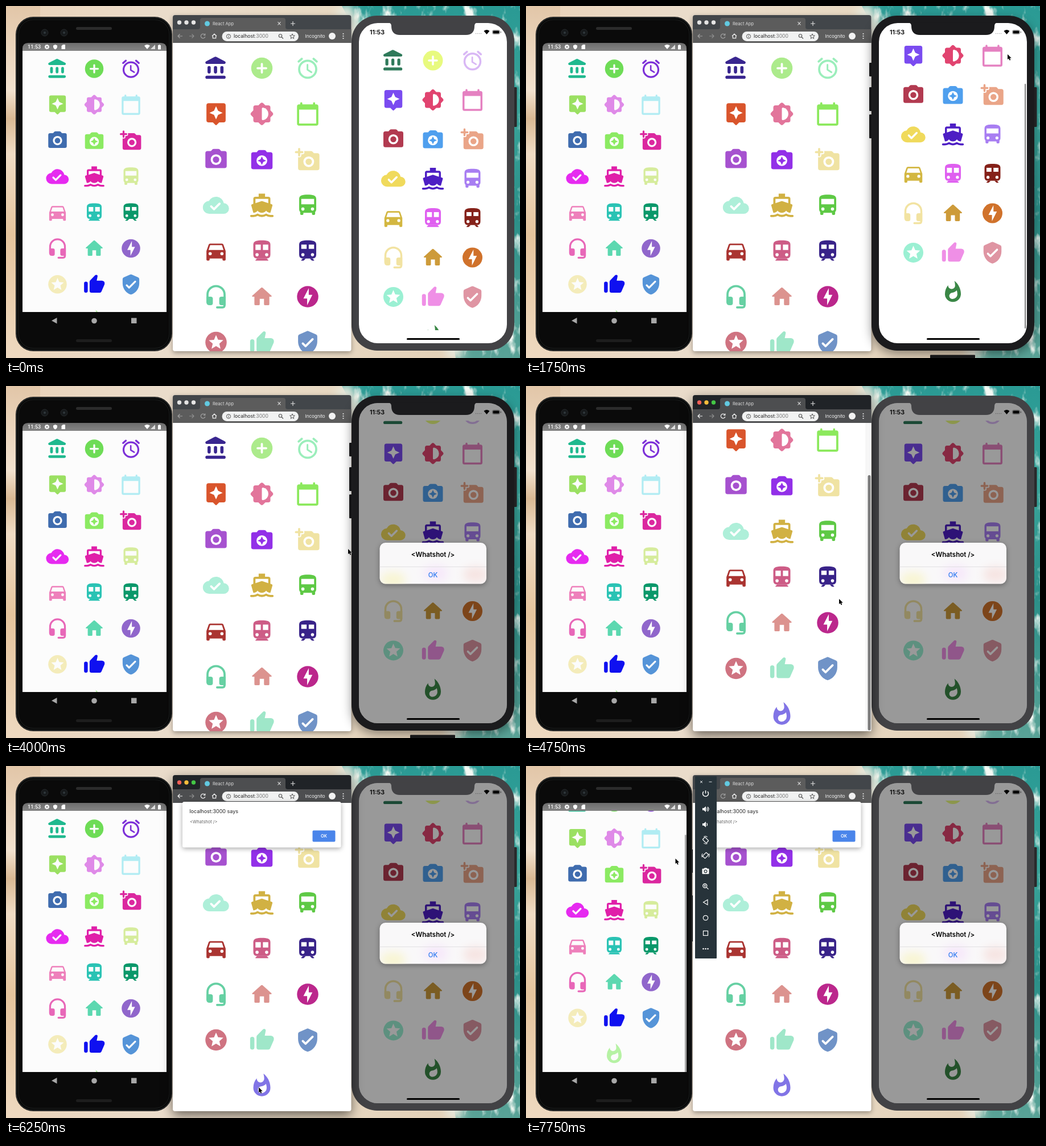
An HTML page that plays this animation: 903x620 px, repeating every 8000 ms.

```html
<!DOCTYPE html>
<html lang="en">
<head>
<meta charset="utf-8">
<title>Icons on three platforms</title>
<style>
  html, body { margin: 0; width: 100%; height: 100%; overflow: hidden; }
  svg { display: block; }
  text { font-family: Inter, sans-serif; }
  .fill { fill: currentColor; }
  .hole { fill: var(--bg); }
  .line, .cut { fill: none; stroke: currentColor; stroke-width: 2; stroke-linecap: round; stroke-linejoin: round; }
  .cut { stroke: var(--bg); }
  #chrome { --bg: #fff; --strip: #42464a; --bar: #5c5c5c; --ink: #a2a2a2; --red: #e4e4e4; --amber: #e4e4e4; --green: #e4e4e4; }
  #chrome.on { --strip: #202327; --bar: #4d4e50; --ink: #f4f4f4; --red: #f35f57; --amber: #f6bd3b; --green: #43c645; }
  #win { filter: drop-shadow(0 3px 4px rgba(0,0,0,.35)); }
  #chrome.on #win { filter: drop-shadow(0 7px 10px rgba(0,0,0,.55)); }
  #ios { --bg: #fff; --bezel: #424245; }
  #ios.on { --bezel: #1b1b1d; }
  #ios.on #case { filter: drop-shadow(0 6px 9px rgba(0,0,0,.4)); }
  #android { --bg: #fcfcfc; }
  #dialog rect:first-child, #alert { filter: drop-shadow(0 2px 4px rgba(0,0,0,.35)); }
</style>
</head>
<body>
<script>
const LOOP = 8000, STEP = 250;

// Icons on a 24 unit grid, three per row
const camera = y => `<path class="fill" d="M20 ${y + 4}h-3.2l-1.2-1.4q-.6-.6-1.5-.6H9.9q-.9 0-1.5.6L7.2 ${y + 4}H4q-2 0-2 2v12q0 2 2 2h16q2 0 2-2V${y + 6}q0-2-2-2z"/><circle class="hole" cx="12" cy="${y + 12}" r="5"/>`;
const disc = '<circle class="fill" cx="12" cy="12" r="10"/>';
const lamps = y => `<path class="cut" stroke-width="3" style="stroke-width:3" d="M7.5 ${y}h0M16.5 ${y}h0"/>`;
const coach = '<path class="fill" d="M4 6c0-3.5 3.6-4 8-4s8 .5 8 4v9.5q0 3.5-3.5 3.5h-9Q4 19 4 15.5z"/>';
const icons = [
  '<path class="line" style="stroke-width:3" d="M5.5 11.5v4M11.5 11.5v4M17.5 11.5v4M3.5 20.5h16"/><path class="fill" d="M10.6 1.5 2.7 5.6C1.5 6.3 2 8 3.2 8h16.6c1.2 0 1.7-1.7.5-2.4l-7.9-4.1q-.9-.5-1.8 0z"/>',
  disc + '<path class="cut" d="M8 12h8M12 8v8"/>',
  '<circle class="line" cx="12" cy="13" r="8"/><path class="line" d="M17.5 3.2l3 2.6M6.5 3.2l-3 2.6"/><path class="line" style="stroke-width:1.6" d="M11.8 8.8v4.7l3.7 2.3"/>',
  '<path class="fill" d="M19 2H5Q3 2 3 4v14q0 2 2 2h4l2.3 2.3q.7.6 1.4 0L15 20h4q2 0 2-2V4q0-2-2-2z"/><path class="hole" d="M12 4.8l1.9 4.3 4.3 1.9-4.3 1.9L12 17.2l-1.9-4.3L5.8 11l4.3-1.9z"/>',
  '<path class="fill" d="M20 15.3l1.9-1.9q1.4-1.4 0-2.8L20 8.7V6q0-2-2-2h-2.7l-1.9-1.9q-1.4-1.4-2.8 0L8.7 4H6Q4 4 4 6v2.7l-1.9 1.9q-1.4 1.4 0 2.8L4 15.3V18q0 2 2 2h2.7l1.9 1.9q1.4 1.4 2.8 0l1.9-1.9H18q2 0 2-2z"/><path class="hole" d="M12 17V7q0-1 1.2-.9a6 6 0 0 1 0 11.8Q12 18 12 17z"/>',
  '<rect class="line" x="3" y="4" width="18" height="18" rx="1"/><path class="line" d="M6 2v2M18 2v2"/><path class="fill" d="M3 4h18v4H3z"/>',
  camera(0) + '<circle class="fill" cx="12" cy="12" r="3"/>',
  camera(1) + '<path class="fill" d="M12 17l1.3-2.7L16 13l-2.7-1.3L12 9l-1.3 2.7L8 13l2.7 1.3z"/>',
  '<path class="line" d="M4 2v6M1 5h6"/><path class="fill" d="M21 6h-3.2l-1.2-1.4q-.6-.6-1.5-.6H8.7Q9.6 7 7 7H6v1q0 2.4-3 1.7V20q0 2 2 2h16q2 0 2-2V8q0-2-2-2z"/><circle class="hole" cx="13" cy="14" r="5"/><circle class="fill" cx="13" cy="14" r="3"/>',
  '<path class="fill" d="M19.3 10A7.5 7.5 0 0 0 5.3 8 6 6 0 0 0 6 20h13a5 5 0 0 0 .3-10z"/><path class="cut" d="M7.4 13l2.7 2.7 5.2-5.2"/>',
  '<path class="line" stroke-linecap="butt" d="M2 22h2q2.2 0 4-1.2 4 2.4 8 0 1.800 1.200 4 1.200h2"/><path class="fill" fill-rule="evenodd" d="M4 19q2.400 0 4-2 1.600 2 4 2t4-2q1.600 2 4 2l1.900-6.700q.3-1-.6-1.300L20 10.600V6q0-2-2-2h-3V1H9v3H6Q4 4 4 6v4.600L2.700 11q-.9.3-.6 1.300zM6 6h12v4l-6-2-6 2z"/>',
  '<path class="fill" d="M4 6c0-3.500 3.600-4 8-4s8 .5 8 4v10q0 1.300-1 2.200V20q0 1-1 1h-1q-1 0-1-1v-1H8v1q0 1-1 1H6q-1 0-1-1v-1.800Q4 17.300 4 16z"/><path class="hole" d="M6 6h12v5H6z"/>' + lamps(15.5),
  '<path class="fill" d="M18.900 6q-.4-1-1.400-1h-11Q5.500 5 5.100 6L3 12v8q0 1 1 1h1q1 0 1-1v-1h12v1q0 1 1 1h1q1 0 1-1v-8z"/><path class="hole" d="M5 11l1.500-4.500h11L19 11z"/>' + lamps(14.5).replace('7.5', '6.500').replace('16.5', '17.500'),
  coach + '<path class="fill" d="M7.500 19L6 20.500v.5h12v-.5L16.500 19z"/><path class="hole" d="M6 6h5v5H6zM13 6h5v5h-5z"/>' + lamps(15.5),
  coach + '<path class="fill" d="M7.500 19L6 20.500v.5h2.200l2-2H14l2 2h2v-.5L16.500 19z"/><path class="hole" d="M6 6h5v4H6zM13 6h5v4h-5z"/>' + lamps(15.5),
  '<path class="line" d="M4 17v-7a8 8 0 0 1 16 0v10q0 2-2 2h-5"/><path class="fill" d="M3 12h4q2 0 2 2v4q0 2-2 2H6q-3 0-3-3zM21 12h-4q-2 0-2 2v4q0 2 2 2h4z"/>',
  '<path class="fill" d="M10 19v-5h4v5q0 1 1 1h3q1 0 1-1v-7h1.700q.8-.2.3-.9l-8.300-7.500q-.7-.6-1.400 0L3 11.100q-.5.7.3.9H5v7q0 1 1 1h3q1 0 1-1z"/>',
  disc + '<path class="hole" d="M11.500 20v-6.300H8L13 4v6.300h3.400z"/>',
  disc + '<path class="hole" d="M16.200 18L12 15.500 7.800 18l1.100-4.800L5.200 10l4.900-.4L12 5l1.900 4.500 4.900.4-3.700 3.300z"/>',
  '<path class="fill" d="M13.100 2L7.600 7.600Q7 8.200 7 9v10q0 2 2 2h9q1.300 0 1.800-1.200l3.300-7.600Q24 8.500 20.300 8h-5.600l.9-4.600q.2-.8-.4-1.400-1-.8-2.100 0z"/><path class="line" style="stroke-width:4" d="M3 11v8"/>',
  '<path class="fill" d="M11.200 1.400l-7 3.100Q3 5 3 6.300V11c0 5.500 3.800 10.700 9 12 5.200-1.300 9-6.500 9-12V6.300q0-1.300-1.200-1.800l-7-3.100q-.8-.3-1.600 0z"/><path class="cut" d="M7.400 13l2.600 2.600L16.600 9"/>',
  '<path class="fill" fill-rule="evenodd" d="M13.500.7s.7 2.600.7 4.800a3.500 3.500 0 0 1-7 0v-.4A14 14 0 0 0 4 14a8 8 0 0 0 16 0C20 8.600 17.400 3.800 13.500.7zM11.700 19a3.100 3.100 0 0 1-.4-6.300c1.800-.4 3.600-1.200 4.600-2.500q.6 2 .6 4a4.800 4.800 0 0 1-4.800 4.800z"/>'
];

const tints = {
  android: '20b98f 6edc56 7d31d8 9be062 df8ae8 b1ecf3 3f6cae 8bea62 db279f e62af0 e01fa9 d6ec9c ee80bb 2ac3b4 0a986a e867b8 5cd8b0 9066cb f4ecba 0f10f0 5594d8 b6f2a4',
  chrome: '39268f aceb8c 9beebb d9552c e2759b 8ce95d a651cf 9230e8 f0e3a3 aeefd9 d1b143 5ec945 aa3431 cd5c86 392389 66d0a3 dc938f bb278c cf7381 9fe7c9 7093c7 8174e6',
  ios: '2f7a5a e8fa7f d9b8f5 7a4bf0 e14470 e581c1 b23a50 4f9fee eaa588 f0da5c 4d1ec4 a87ef2 d3b741 df5ff0 852119 f2e3a2 cd9b3a d0722b 9bf0d3 ef8fe6 df95a3 3a8746'
};

const grid = (name, x, y, dx, dy, size) => `<g id="${name}-page">` + tints[name].split(' ').map((c, i) => {
  const col = i === 21 ? 1 : i % 3, row = Math.floor(i / 3);
  return `<use href="#icon${i}" color="#${c}" transform="translate(${x + col * dx} ${y + row * dy}) scale(${size / 24})"/>`;
}).join('') + '</g>';

const rect = (x, y, w, h, fill, r = 0, more = '') => `<rect x="${x}" y="${y}" width="${w}" height="${h}" rx="${r}" fill="${fill}" ${more}/>`;
const dot = (x, y, r, fill, more = '') => `<circle cx="${x}" cy="${y}" r="${r}" fill="${fill}" ${more}/>`;
const path = (d, fill, more = '') => `<path d="${d}" fill="${fill}" ${more}/>`;
const pen = (d, color, w = 1.2, more = '') => path(d, 'none', `stroke="${color}" stroke-width="${w}" ${more}`);
const text = (x, y, s, size, fill, more = '') => `<text x="${x}" y="${y}" font-size="${size}" fill="${fill}" ${more}>${s.replace(/</g, '&lt;')}</text>`;
const clip = (id, x, y, w, h, r = 0) => `<clipPath id="${id}">${rect(x, y, w, h, '#000', r)}</clipPath>`;
const ramp = (id, dir, stops) => `<linearGradient id="${id}" ${dir}>` + stops.map(([o, c, a = 1]) => `<stop offset="${o}" stop-color="${c}" stop-opacity="${a}"/>`).join('') + '</linearGradient>';
const wifi = (x, y, c, s = 1) => path(`M${x} ${y + 4 * s}l${-5 * s} ${-6 * s}q${5 * s} ${-4 * s} ${10 * s} 0z`, c);

const defs = '<defs>' + icons.map((d, i) => `<g id="icon${i}"><g transform="translate(-12 -12)">${d}</g></g>`).join('')
  + ramp('sand', '', [[0, '#e9d2b8'], [.3, '#eadccb'], [.6, '#e8d9c3'], [1, '#dfcbb0']])
  + ramp('dune', 'x2="0" y2="1"', [[0, '#e2c6a8'], [.24, '#f2e2cf'], [.32, '#d9b994'], [.42, '#efdcc5'], [.65, '#e5c49d'], [1, '#eed9c0']])
  + ramp('sea', 'x2="0" y2="1"', [[0, '#2a9a94'], [.3, '#39a399'], [.6, '#2b8f88'], [1, '#5aa397']])
  + ramp('status', 'x2="0" y2="1"', [[0, '#6c6c6c'], [1, '#868686']])
  + clip('androidView', 29, 79, 253, 460) + clip('chromeView', 293, 65, 313.5, 543)
  + clip('iosView', 620, 61, 260, 510) + clip('iosScreen', 620, 30, 260, 564, 33) + clip('alertBox', 656.5, 276, 187.500, 72.500, 10)
  + '<filter id="soft" x="-50%" y="-50%" width="200%" height="200%"><feGaussianBlur stdDeviation="8"/></filter>'
  + '<filter id="foam"><feTurbulence type="fractalNoise" baseFrequency=".05 .025" numOctaves="4" seed="5"/><feColorMatrix values="0 0 0 0 .9  0 0 0 0 .95  0 0 0 0 .9  0 4 0 0 -2.1"/><feComposite in2="SourceGraphic" operator="in"/></filter></defs>';

const shore = 'M590 0C640 90 690 230 740 370S780 560 790 620H903V0z';
const beach = rect(0, 0, 903, 620, 'url(#sand)') + rect(0, 0, 60, 620, 'url(#dune)') + path(shore, 'url(#sea)')
  + path(shore, '#fff', 'filter="url(#foam)"')
  + pen('M590 0C640 90 690 230 740 370S780 560 790 620', '#e6e8dc', 30, 'filter="url(#soft)"');

const android = '<g id="android"><g id="android-keys">' + rect(290, 147, 5, 41, '#161616', 1) + rect(290, 228, 5, 81, '#161616', 1) + '</g>'
  + rect(17, 19, 275, 589, '#111', 31) + rect(18.500, 20.500, 272, 586, '#070808', 29, 'stroke="#3b3f40" stroke-width="1"') + rect(22, 24, 265, 579, '#0a0a0a', 26, 'stroke="#1f2121"')
  + rect(123, 37, 63, 5, '#2b2b2b', 2.500) + rect(123, 587, 63, 5, '#1d1d1d', 2.500)
  + [68, 102].map(x => dot(x, 47, 6, '#16191b', 'stroke="#262a2c"') + dot(x, 47, 2, '#30383c')).join('')
  + path('M29 80V75q0-10 10-10h233q10 0 10 10v5z', 'url(#status)') + rect(29, 79, 253, 460, '#fcfcfc')
  + text(38, 75.300, '11:53', 9.200, '#fff', 'style="font-family:Roboto,sans-serif" font-weight="500"')
  + dot(72, 72, 2.500, 'none', 'stroke="#fff" stroke-width="1.900"') + dot(72, 72, 3.900, 'none', 'stroke="#fff" stroke-width="1" stroke-dasharray="1.500 1.560"')
  + path('M86.500 68l3.500 1.500v3q-.6 2.700-3.500 4-2.900-1.300-3.500-4v-3z', '#fff') + path('M100 68h4v8h-6.500v-5.500z', '#fff')
  + wifi(248, 72, '#fff') + path('M254 76l8-8v8z', '#ddd') + path('M267 69h1.500v-1h2v1h1.500v7.500h-5z', '#fff')
  + path('M89.500 549v10.500l-9.500-5.200z', '#a8a8a8') + dot(155, 554.500, 4.800, '#a8a8a8') + rect(220, 549.500, 9.500, 9.500, '#a8a8a8')
  + `<g clip-path="url(#androidView)">${grid('android', 90.5, 110.5, 64.5, 63.3, 39)}<rect id="android-thumb" x="279" width="2.500" height="418" fill="#9c9c9c"/></g></g>`;

const ink = 'var(--ink)';
const chrome = '<g id="chrome">' + rect(293, 16, 313.500, 592, '#fff', 4, 'id="win"')
  + path('M293 65V20q0-4 4-4h305.500q4 0 4 4v45z', 'var(--strip)') + path('M337 41q4 0 4-4V25q0-4 4-4h142q4 0 4 4v12q0 4 4 4h111.500v24H293V41z', 'var(--bar)')
  + ['red', 'amber', 'green'].map((c, i) => dot(304.5 + i * 12.5, 29, 3.7, `var(--${c})`)).join('')
  + dot(353.500, 31, 4.500, '#61c9e0') + text(363, 33.800, 'React App', 7.600, '#dedede') + pen('M477.500 28l5 5.500m0-5.500l-5 5.500M500 31h8m-4-4v8', '#e4e4e4', 1.100)
  + pen('M310 53h-8m3.500-3.500L302 53l3.500 3.500', ink) + pen('M322 53h8m-3.500-3.500L330 53l-3.500 3.500', '#8f8f8f')
  + pen('M349 50.500a3.800 3.800 0 1 0 .8 3.500M349.800 48.500v3h-3', ink) + pen('M362 53l4-3.800 4 3.800M363.300 52.500v4.200h5.400v-4.200', '#eee')
  + rect(379.500, 45, 134.500, 17, '#f1f2f2', 8.500) + dot(391, 53.500, 3.600, 'none', 'stroke="#555"') + pen('M391 51v.9m0 1v2.600', '#555', 1)
  + text(400, 56.300, 'localhost<tspan fill="#777">:3000</tspan>', 8.650, '#222').replace('&lt;tspan', '<tspan').replace('&lt;/', '</')
  + dot(482, 52.500, 2.700, 'none', 'stroke="#555" stroke-width="1.100"') + pen('M484 54.500l3 3', '#555') + pen('M503 49l1.200 2.900 3.200.2-2.400 2.100.7 3.100-2.700-1.700-2.700 1.700.7-3.100-2.400-2.100 3.200-.2z', '#555', 1)
  + text(525.500, 56, 'Incognito', 8, '#f3f3f3') + dot(573, 53, 6, '#f2f2f2') + [49, 53, 57].map(y => dot(592.5, y, 1.1, '#eee')).join('')
  + '<g clip-path="url(#chromeView)">' + grid('chrome', 369, 109.5, 80.5, 80.5, 45)
  + '<g id="chrome-thumb">' + rect(597, 65, 9.500, 543, '#f7f7f7', 0, 'stroke="#e8e8e8" stroke-width=".5"') + rect(600.500, 157, 5, 449.500, '#7c7c7c', 2.500) + '</g></g>'
  + '<g id="dialog">' + rect(310, 63, 278.500, 80.500, '#fff', 3) + text(408, 82.500, 'localhost:3000 says', 9, '#222', 'text-anchor="end"')
  + text(371.500, 101, '<Whatshot />', 7.500, '#666', 'text-anchor="end"') + rect(538.500, 113.500, 40, 20, '#4a85ea', 2) + text(558.500, 126.300, 'OK', 7.500, '#fff', 'text-anchor="middle" font-weight="600"') + '</g></g>';

const glow = (x, y, c) => `<ellipse cx="${x}" cy="${y}" rx="22" ry="14" fill="${c}" filter="url(#soft)"/>`;
const ios = '<g id="ios"><g id="ios-keys">' + [[100, 24], [143, 42], [191, 42]].map(([y, h]) => rect(603, y, 6, h, '#1b1b1d', 1)).join('') + rect(710, 614.500, 79, 6, '#1b1b1d', 1) + '</g>'
  + rect(890, 143, 7.500, 70, '#29292b', 1.500) + rect(607, 17, 286, 590, 'var(--bezel)', 45, 'id="case"') + rect(620, 30, 260, 564, '#fff', 33)
  + text(639, 50, '11:53', 10.800, '#000', 'font-weight="600"') + [0, 1, 2, 3].map(i => dot(825.5 + i * 3, 48.5, .8, '#aaa')).join('')
  + wifi(844.500, 46, '#000') + rect(854.500, 42.500, 13, 7, '#fff', 2, 'stroke="#888" stroke-width=".8"') + rect(855.500, 43.500, 11, 5, '#000', 1) + rect(868.800, 44.800, 1.200, 2.500, '#777')
  + `<g clip-path="url(#iosView)">${grid('ios', 680.5, 96, 69.5, 69.4, 42)}<rect id="ios-thumb" x="876" width="2.200" rx="1.100" fill="#858585"/></g>`
  + '<g id="modal">' + rect(620, 30, 260, 564, '#000', 33, 'opacity=".4"')
  + `<g id="alert"><g clip-path="url(#alertBox)">${rect(656, 276, 189, 73, '#f9f8f9')}${glow(680, 342, '#f8f5d2')}${glow(755, 330, '#f6e8fa')}${glow(825, 332, '#f6e4e2')}${rect(656, 318, 189, .7, '#d9d7da')}</g>`
  + text(750, 301, '<Whatshot />', 11.500, '#000', 'text-anchor="middle" font-weight="600"') + text(750, 337, 'OK', 11.400, '#2678f0', 'text-anchor="middle" font-weight="500"') + '</g></g>'
  + path('M671 29.500c4 0 6 2 6 6 0 10 5 15.500 15 15.500h116c10 0 15-5.500 15-15.500 0-4 2-6 6-6z', 'var(--bezel)') + rect(704, 585, 93, 3, '#000', 1.500) + '</g>';

const speaker = y => path(`M310 ${y - 2}h2.500l3.500-3v10l-3.500-3H310z`, '#fff') + pen(`M317.500 ${y - 2.500}q2 2.500 0 5`, '#fff');
const tilt = (y, a) => `<g transform="translate(315.500 ${y}) rotate(${a})">${rect(-3, -4.500, 6, 9, 'none', 1, 'stroke="#fff" stroke-width="1.300"')}${pen('M-6 1.500a6.200 6.200 0 0 0 4 5M6-1.500a6.200 6.200 0 0 0-4-5', '#fff', 1)}</g>`;
const emulator = '<g id="emulator">' + rect(297, 18, 38, 321, '#27333a', 1) + pen('M306 26l4 4m0-4l-4 4M321.500 28h5', '#dfe3e5', 1)
  + pen('M315.500 43v5.500M312 45a5 5 0 1 0 7 0', '#fff', 1.500) + speaker(76) + pen('M319 72q4 4 0 8', '#fff') + speaker(103) + tilt(130.500, -45) + tilt(157.500, 45)
  + '<use href="#icon6" color="#fff" style="--bg:#27333a" transform="translate(315.500 185.500) scale(.600)"/>'
  + dot(314.300, 211, 3.500, 'none', 'stroke="#fff" stroke-width="1.300"') + pen('M317 213.700l3.500 3.500M312.500 211h3.600m-1.800-1.800v3.600', '#fff', 1.200)
  + pen('M319 235.500v9l-7.500-4.500z', '#fff') + dot(315.500, 267.500, 4.200, 'none', 'stroke="#fff" stroke-width="1.200"') + rect(311.500, 290.500, 8, 8, 'none', 0, 'stroke="#fff" stroke-width="1.200"')
  + [311.500, 315.500, 319.500].map(x => dot(x, 322, 1.3, '#fff')).join('') + '</g>';

const cursor = path('M0 0v9.300l2.100-1.900 1.500 3.300 1.700-.7-1.500-3.300h2.900z', '#000', 'id="cursor" stroke="#fff" stroke-width=".8" paint-order="stroke"');

document.body.innerHTML = `<svg id="stage" width="903" height="620" viewBox="0 0 903 620">${defs + beach + android + ios + chrome + emulator + cursor}</svg>`;

// Timelines: [ms, value, ...]
const iosScroll = [[1250, 0], [1500, 40], [1750, 78], [2000, 62], [2250, 48], [2500, 46.500]];
const chromeScroll = [[4250, 0], [4500, 40], [4750, 95], [5000, 110]];
const androidScroll = [[7250, 0], [7500, 24], [7750, 46.500]];
const modalFade = [[3000, 0], [3500, 1]];
const pointer = [[250, 880, 300], [750, 846, 220], [1250, 846, 190], [1750, 846, 85], [2000, 846, 85], [2750, 752, 534], [3500, 752, 534],
  [4000, 601, 287], [4500, 560, 330], [5000, 540, 420], [5500, 429.500, 557], [5750, 444, 566], [6500, 444, 566], [6750, 262.500, 273], [7250, 262.500, 273], [7500, 262.500, 225], [7750, 262.500, 163]];

function at(keys, t, k = 1) {
  const i = keys.findIndex(key => key[0] > t);
  if (i === 0) return keys[0][k];
  if (i < 0) return keys[keys.length - 1][k];
  const a = keys[i - 1], b = keys[i];
  return a[k] + (b[k] - a[k]) * (t - a[0]) / (b[0] - a[0]);
}

const $ = id => document.getElementById(id);
const show = (id, on) => $(id).setAttribute('visibility', on ? 'visible' : 'hidden');
const move = (id, x, y) => $(id).setAttribute('transform', `translate(${x} ${y})`);
const within = (t, a, b) => t >= a && t < b;

function draw(t) {
  const iosOn = within(t, 500, 4250), chromeOn = within(t, 4250, 7250), androidOn = t >= 7250;
  $('ios').classList.toggle('on', iosOn);
  $('chrome').classList.toggle('on', chromeOn);
  const front = $(iosOn ? 'ios' : 'chrome');
  if (front.nextSibling !== $('emulator')) $('stage').insertBefore(front, $('emulator'));
  show('ios-keys', iosOn);
  show('android-keys', androidOn);
  show('emulator', androidOn);

  const y = at(iosScroll, t), top = 62 + y * .96, drop = at(androidScroll, t);
  move('ios-page', 0, -y);
  move('chrome-page', 0, -at(chromeScroll, t));
  move('android-page', 0, -drop);
  $('ios-thumb').setAttribute('y', top);
  $('ios-thumb').setAttribute('height', Math.min(461, 568 - top));
  $('android-thumb').setAttribute('y', 79 + drop * .91);
  show('ios-thumb', within(t, 1500, 2750));
  show('chrome-thumb', within(t, 4500, 6000));
  show('android-thumb', t >= 7500);

  $('modal').setAttribute('opacity', at(modalFade, t));
  show('dialog', t >= 5750);
  show('cursor', t >= 250);
  move('cursor', at(pointer, t), at(pointer, t, 2));
}

function tick() {
  const t = performance.now() % LOOP;
  draw(Math.floor(t / STEP) * STEP);
  requestAnimationFrame(tick);
}
tick();
</script>
</body>
</html>
```
